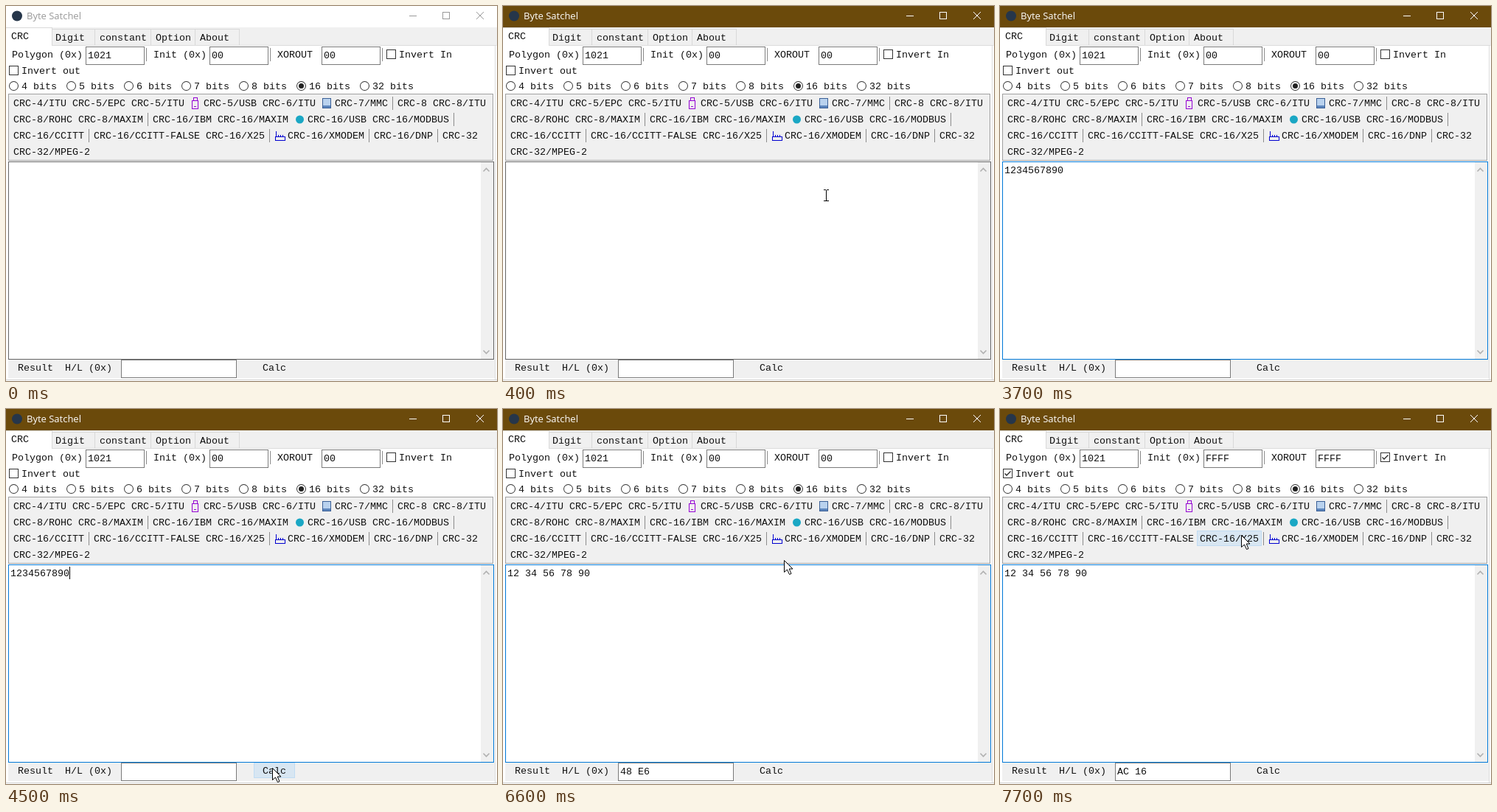
An HTML page with a canvas for the animation above (8000 ms loop, 666x509 px).

```html
<!DOCTYPE html>
<html lang="en">
<head>
<meta charset="utf-8">
<title>Byte Satchel</title>
<style>
html, body { margin: 0; width: 666px; height: 509px; overflow: hidden; background: #fff; }
canvas { display: block; }
</style>
</head>
<body>
<canvas id="stage" width="666" height="509"></canvas>
<script>
const g = document.getElementById('stage').getContext('2d');
const LOOP = 8000, STEP = 100, CHAR = 8;
const MONO = "13.333px 'Liberation Mono', 'Courier New', monospace";
const SANS = "13px 'Open Sans', 'Noto Sans', sans-serif";
const GREY = '#f0f0f0', RULE = '#8c8c8c', INK = '#111';

const FOCUS = 500, CALC = 5100, PRESET = 7700;

// Pointer path: time, x, y
const path = [
  [100, 560, 300], [300, 438, 257], [3800, 438, 257], [4000, 461, 300], [4500, 361, 487],
  [5500, 361, 487], [5700, 366, 464], [6400, 390, 225], [6900, 367, 174], [7300, 327, 171]
];

// "|" is a separator, "icon:" puts an icon before the label
const presets = [
  'CRC-4/ITU CRC-5/EPC CRC-5/ITU stick:CRC-5/USB CRC-6/ITU card:CRC-7/MMC | CRC-8 CRC-8/ITU',
  'CRC-8/ROHC CRC-8/MAXIM | CRC-16/IBM CRC-16/MAXIM usb:CRC-16/USB CRC-16/MODBUS |',
  'CRC-16/CCITT | CRC-16/CCITT-FALSE CRC-16/X25 | modem:CRC-16/XMODEM | CRC-16/DNP | CRC-32',
  'CRC-32/MPEG-2'
];

const icons = {
  stick(x, y) {
    frame(x + 3, y + 3, 6, 6, '#9400d3', GREY);
    frame(x + 1, y + 7, 9, 12, '#9400d3', GREY);
    fill(x + 4, y + 15, 3, 1, '#9400d3');
  },
  card(x, y) {
    frame(x, y + 4, 12, 14, '#3a5f96', '#b9d2ee');
    fill(x + 1, y + 14, 10, 3, '#5d86bd');
  },
  usb(x, y) {
    disc(x + 6.5, y + 11, 5.5, '#1aa7c4');
  },
  modem(x, y) {
    fill(x + 1, y + 5, 1, 8, '#0000d0');
    frame(x, y + 12, 14, 6, '#0000d0', GREY);
    for (let i = 1; i < 4; i++) fill(x + 3 * i + 1, y + 10, 1, 3, '#0000d0');
  }
};

function fill(x, y, w, h, color) {
  g.fillStyle = color;
  g.fillRect(x, y, w, h);
}

function frame(x, y, w, h, border, inside) {
  fill(x, y, w, h, border);
  fill(x + 1, y + 1, w - 2, h - 2, inside);
}

function text(s, x, y, color = INK, font = MONO) {
  g.font = font;
  g.fillStyle = color;
  g.fillText(s, x, y);
}

function line(points, color, width = 1) {
  g.beginPath();
  points.forEach(([x, y]) => g.lineTo(x, y));
  g.strokeStyle = color;
  g.lineWidth = width;
  g.stroke();
}

function disc(x, y, r, color) {
  g.beginPath();
  g.arc(x, y, r, 0, 7);
  g.fillStyle = color;
  g.fill();
}

function field(x, y, w, value) {
  frame(x, y, w, 25, '#7a7a7a', '#fff');
  text(value, x + 3, y + 16);
}

function checkbox(x, y, label, checked) {
  frame(x, y, 13, 13, '#333', '#fff');
  if (checked) line([[x + 2.5, y + 6.5], [x + 5, y + 9], [x + 10.5, y + 3.5]], '#222', 1.3);
  text(label, x + 17, y + 11);
}

function radio(x, y, label, selected) {
  disc(x, y, 6.5, '#333');
  disc(x, y, 5.5, '#fff');
  if (selected) disc(x, y, 3.5, '#222');
  text(label, x + 10.5, y + 4.5);
}

function titleBar(active) {
  const ink = active ? '#fff' : '#999';
  fill(0, 0, 666, 29, active ? '#6b4a0b' : '#fff');
  disc(15, 13.5, 7, '#26364a');
  text('Byte Satchel', 28, 18, ink, SANS);
  fill(547, 13, 10, 1, ink);
  frame(592, 8, 10, 10, ink, active ? '#6b4a0b' : '#fff');
  line([[638, 8], [648, 18]], ink);
  line([[648, 8], [638, 18]], ink);
}

function tabs() {
  fill(0, 29, 666, 25, GREY);
  let x = 60;
  for (const label of ['Digit', 'constant', 'Option', 'About']) {
    const w = Math.max(6, label.length) * CHAR + 12;
    frame(x, 31, w + 1, 23, '#d9d9d9', GREY);
    text(label, x + 7, 47);
    x += w;
  }
  fill(0, 53, 665, 1, '#dcdcdc');
  frame(-1, 29, 64, 30, '#d9d9d9', '#fff');
  fill(0, 54, 663, 5, '#fff');
  text('CRC', 7, 45);
}

function settings(preset) {
  const mask = preset ? 'FFFF' : '00';
  let x = 8;
  for (const [label, value] of [['Polygon (0x)', '1021'], ['Init (0x)', mask], ['XOROUT ', mask]]) {
    text(label, x, 70);
    x += label.length * CHAR + 4;
    field(x, 55, 80, value);
    fill(x + 82, 57, 1, 18, RULE);
    x += 92;
  }
  checkbox(516, 59, 'Invert In', preset);
  checkbox(4, 81, 'Invert out', preset);

  x = 10.5;
  for (const n of [4, 5, 6, 7, 8, 16, 32]) {
    const label = n + ' bits';
    radio(x, 108.5, label, n === 16);
    x += label.length * CHAR + 30;
  }
}

// Flat button that lights up under the pointer
function button(x, y, w, spot, pressed) {
  const h = 21;
  if (!spot || spot[0] < x || spot[0] >= x + w || spot[1] < y || spot[1] >= y + h) return;
  frame(x, y, w, h, pressed ? '#90c8f6' : '#c0dcf3', pressed ? '#c0dcf3' : '#d8e6f2');
}

function strip(spot, pressed) {
  frame(3, 119, 658, 91, '#a0a0a0', GREY);
  presets.forEach((row, i) => {
    const y = 121 + 22 * i;
    let x = 6;
    for (const item of row.split(' ')) {
      if (item === '|') {
        fill(x + 2, y + 2, 1, 18, RULE);
        x += 5;
        continue;
      }
      const [label, icon] = item.split(':').reverse();
      const inset = icon ? 22 : 4;
      const w = inset + label.length * CHAR + 4;
      button(x, y, w, spot, pressed);
      if (icon) icons[icon](x + 5, y);
      text(label, x + inset, y + 15);
      x += w;
    }
  });
}

function editor(content, focused, caretX) {
  frame(3, 211, 659, 269, focused ? '#0078d7' : '#646464', '#fff');
  fill(644, 212, 17, 267, GREY);
  for (const [y, d] of [[222.5, -2], [469.5, 2]]) {
    line([[647.5, y - d], [651.5, y + d], [655.5, y - d]], '#b0b0b0', 1.6);
  }
  text(content, 6, 227);
  if (caretX) fill(caretX, 214, 1, 17, '#000');
}

function resultBar(result, spot, pressed) {
  fill(3, 480, 660, 25, GREY);
  button(336, 480, 56, spot, pressed);
  text('Result  H/L (0x)', 16, 495);
  field(156, 480, 157, result);
  text('Calc', 348, 495);
}

function pointerAt(t, typing) {
  if (t < path[0][0] || typing) return null;
  const i = path.findIndex(p => p[0] > t);
  if (i < 0) return path.at(-1).slice(1);
  const a = path[i - 1], b = path[i];
  const k = (t - a[0]) / (b[0] - a[0]);
  return [1, 2].map(n => Math.round(a[n] + (b[n] - a[n]) * k));
}

function pointer([x, y]) {
  if (y > 211 && y < 480) {
    fill(x, y - 7, 1, 15, '#000');
    for (const end of [y - 8, y + 7]) {
      fill(x - 3, end, 3, 1, '#000');
      fill(x + 1, end, 3, 1, '#000');
    }
    return;
  }
  g.beginPath();
  [[0, 0], [0, 16], [4, 12.5], [7, 19], [9.5, 18], [6.7, 11.5], [11.5, 11.5]]
    .forEach(([dx, dy]) => g.lineTo(x + .5 + dx, y + .5 + dy));
  g.closePath();
  g.fillStyle = '#fff';
  g.fill();
  g.strokeStyle = '#000';
  g.lineWidth = 1;
  g.stroke();
}

function caretVisible(t) {
  if (t < FOCUS) return false;
  if (t < 3200) return true;
  const since = t < CALC ? 3200 : CALC;
  return Math.floor((t - since) / 500) % 2 === 0;
}

function draw(t) {
  const calculated = t >= CALC, preset = t >= PRESET;
  const typed = Math.max(0, Math.min(10, Math.floor((t - 690) / 288) + 1));
  const content = calculated ? '12 34 56 78 90' : '1234567890'.slice(0, typed);
  const caretX = caretVisible(t) && 6 + (calculated ? 0 : CHAR * typed);
  const spot = pointerAt(t, typed > 0 && t < 3900);
  const pressed = t === CALC - STEP || t === PRESET - STEP;

  fill(0, 0, 666, 509, '#fff');
  titleBar(t >= 400);
  tabs();
  settings(preset);
  strip(spot, pressed);
  editor(content, t >= FOCUS, caretX);
  resultBar(preset ? 'AC 16' : calculated ? '48 E6' : '', spot, pressed);
  fill(663, 53, 1, 455, '#dcdcdc');
  fill(0, 507, 666, 1, '#d0d0d0');
  if (spot) pointer(spot);
}

const start = performance.now();
function tick() {
  const t = (performance.now() - start) % LOOP;
  draw(Math.floor(t / STEP) * STEP);
  requestAnimationFrame(tick);
}
tick();
</script>
</body>
</html>
```
